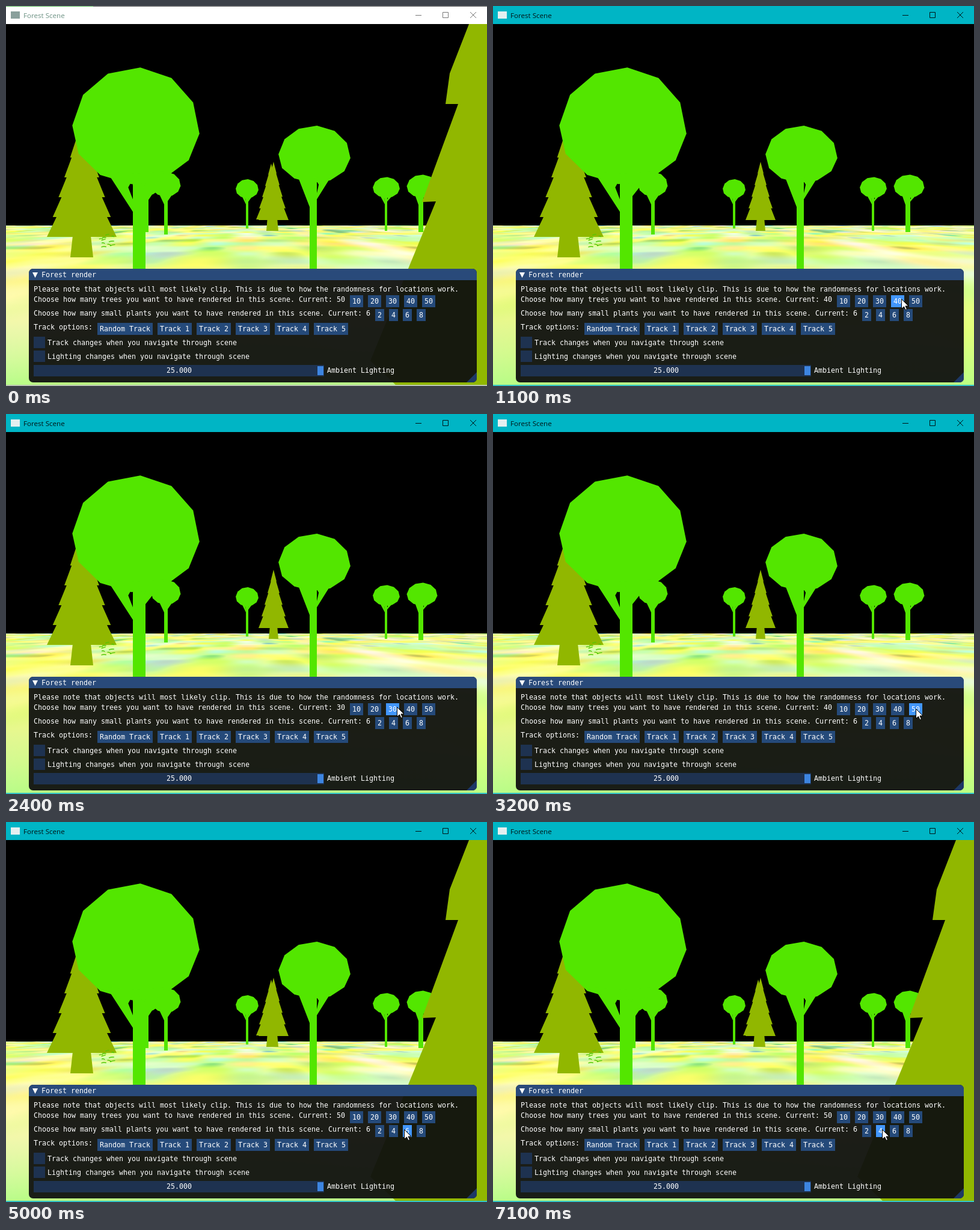
Animation, 800 px wide and 632 px high, one loop 7200 ms. Source, as an HTML page with a canvas:

```html
<!DOCTYPE html>
<html lang="en">
<head>
<meta charset="utf-8">
<title>Forest Scene</title>
<style>
html, body { margin: 0; width: 100%; height: 100%; overflow: hidden; background: #000; }
canvas { display: block; }
</style>
</head>
<body>
<canvas id="stage" width="800" height="632"></canvas>
<script>
const W = 800, H = 632, LOOP = 7200, STEP = 100, HORIZON = 365;
const ctx = document.getElementById('stage').getContext('2d');
const LEAF = '#53e600', PINE = '#91b700';
const MONO = '11.63px "DejaVu Sans Mono", monospace';

// Cursor stops: time, x, y
const PATH = [
  [100, 800, 400], [800, 680, 487], [1500, 677, 487], [1900, 637, 486], [2200, 637, 487],
  [2700, 670, 488], [3200, 703, 490], [3500, 723, 495], [3800, 723, 495], [4000, 703, 490],
  [5000, 662, 511], [5600, 686, 513], [6100, 686, 513], [6200, 675, 513], [7200, 644, 511]
];
const TREES = [[0, 50], [1000, 40], [2100, 30], [2700, 40], [4000, 50]];
const PLANTS = [[0, 6], [5700, 8], [6500, 6]];

const latest = (steps, t) => steps.filter(s => s[0] <= t).pop()[1];

function cursorAt(t) {
  if (t < PATH[0][0]) return null;
  const i = PATH.findIndex(p => p[0] > t);
  const a = PATH[i - 1], b = PATH[i], k = (t - a[0]) / (b[0] - a[0]);
  return [a[1] + (b[1] - a[1]) * k, a[2] + (b[2] - a[2]) * k];
}

function rect(x, y, w, h, color) {
  ctx.fillStyle = color;
  ctx.fillRect(x, y, w, h);
}

function poly(pts, color) {
  ctx.fillStyle = color;
  ctx.beginPath();
  for (const p of pts) ctx.lineTo(p[0], p[1]);
  ctx.fill();
}

function text(s, x, y, color = '#fff', font = MONO) {
  ctx.font = font;
  ctx.fillStyle = color;
  ctx.fillText(s, x, y);
}

function hash(x, y, seed) {
  let n = Math.imul(x, 374761393) ^ Math.imul(y, 668265263) ^ Math.imul(seed, 1274126177);
  n = Math.imul(n ^ (n >>> 13), 1274126177);
  return ((n ^ (n >>> 16)) >>> 0) / 4294967296;
}

function noise(x, y, seed) {
  const i = Math.floor(x), j = Math.floor(y);
  const ease = v => v * v * (3 - 2 * v);
  const u = ease(x - i), v = ease(y - j);
  const a = hash(i, j, seed), b = hash(i + 1, j, seed);
  const c = hash(i, j + 1, seed), d = hash(i + 1, j + 1, seed);
  return a + (b - a) * u + (c - a + (a - b - c + d) * u) * v;
}

// Bright blotches laid flat in perspective
function makeGround() {
  const c = document.createElement('canvas');
  c.width = W;
  c.height = H - HORIZON;
  const g = c.getContext('2d'), img = g.createImageData(W, c.height);
  let p = 0;
  for (let y = 0; y < c.height; y++) {
    const d = y + 20, v = 400 / d, near = Math.min(1, y / 110);
    for (let x = 0; x < W; x++) {
      const u = (x - 400) / d;
      const shade = Math.max(0, 0.32 - noise(u, v, 4)) * 260 * (1 - near);
      img.data[p++] = 185 + 100 * noise(u, v, 1) - shade * 1.4;
      img.data[p++] = 232 + 45 * noise(u, v, 2) - shade * 0.8;
      img.data[p++] = 60 + 150 * noise(u, v, 3) + 40 * noise(u * 2, v * 2, 5);
      img.data[p++] = 255;
    }
  }
  g.putImageData(img, 0, 0);
  return c;
}
const ground = makeGround();

// x is the trunk, cx the crown; fork is where branches meet the trunk, in crown radii
function roundTree(x, cx, y, rx, ry, trunk, base, fork = 1.45) {
  const crown = [], h = trunk / 2, at = (dx, dy) => [cx + dx * rx, y + dy * ry];
  for (let i = 0; i < 12; i++) {
    const a = (i * 30 + 4) * Math.PI / 180, s = Math.sin(a);
    crown.push(at(Math.cos(a), s > 0 ? s * 0.87 : s));
  }
  poly(crown, LEAF);
  rect(x - h, y + ry * 0.7, trunk, base - y - ry * 0.7, LEAF);
  for (const s of [-1, 1]) {
    const end = s < 0 ? fork : fork - 0.25;
    poly([at(s * 0.46, 0.66), [x + s * h, y + end * ry], [x + s * h, y + (end - 0.2) * ry],
      at(s * 0.12, 0.92), at(0, 0.7)], LEAF);
  }
}

function pine(x, top, base, half, tiers, trunk, foot) {
  const edge = s => {
    const pts = [[x, top]];
    for (let i = 1; i <= tiers; i++) {
      const y = top + (base - top) * i / tiers, w = half * i / tiers;
      pts.push([x + s * w, y], [x + s * w * 0.87, y]);
    }
    return pts;
  };
  poly([...edge(-1), ...edge(1).reverse()], PINE);
  poly([[x - trunk * 0.8, base], [x + trunk * 0.8, base], [x + trunk, foot], [x - trunk, foot]], PINE);
}

function sprig(x, y, w, h, count, seed) {
  ctx.strokeStyle = '#4fc800';
  ctx.lineWidth = 1.4;
  ctx.beginPath();
  for (let i = 0; i < count; i++) {
    const px = x + w * hash(i, 1, seed), py = y + h * (i + 0.5) / count;
    const len = 4 + 5 * hash(i, 2, seed), tilt = 5 * hash(i, 3, seed) - 2.5;
    ctx.moveTo(px, py);
    ctx.quadraticCurveTo(px + len / 2, py - 1.5, px + len, py + tilt);
  }
  ctx.stroke();
}

function drawScene(full, plants) {
  rect(0, 30, W, H - 30, '#000');
  ctx.drawImage(ground, 0, HORIZON);
  const haze = ctx.createLinearGradient(0, 400, 0, H);
  haze.addColorStop(0, 'rgba(245,255,140,0)');
  haze.addColorStop(0.4, full ? 'rgba(255,255,185,.6)' : 'rgba(232,255,125,.6)');
  haze.addColorStop(1, 'rgba(165,255,140,.75)');
  rect(0, 400, W, H - 400, haze);

  if (plants === 8) sprig(331, 329, 16, 57, 18, 9);
  roundTree(401, 401, 305, 19, 17, 4, 370);
  roundTree(632, 632.5, 303, 22.5, 18.5, 4, 374);
  roundTree(690, 692, 301, 25.5, 20.5, 8, 376);
  roundTree(266, 266, 298, 24.5, 22, 6, 380);
  if (full) {
    pine(441, 262, 355, 25, 5, 8, 374);
    roundTree(234, 234, 296, 24, 22, 6, 376);
  }
  pine(445, 259, 356, 25, 5, 8, 374);
  roundTree(511, 513, 250, 60, 51, 12, 440, 1.65);
  pine(126, 186, 384, 58, 6, 19, 418);
  sprig(153, 380, 23, 22, 10, 5);
  roundTree(221.5, 216, 206, 106, 104, 21, 440, 1.31);
  if (full) {
    poly([[770, 30], [738, 112], [731, 163], [752, 163], [692, 326], [715, 325],
      [606, 590], [650, H], [W, H], [W, 30]], PINE);
  }
}

function drawTitleBar(active) {
  const ink = active ? '#001416' : '#777';
  rect(0, 0, W, 30, active ? '#00b5c5' : '#fff');
  if (!active) {
    rect(0, 0, W, 1, '#555');
    rect(0, 0, 145, 1, '#55b855');
  }
  rect(0, 630, W, 2, active ? '#35c3c4' : '#b9c4b0');
  rect(8, 9, 15, 12, active ? '#e4eff0' : '#8aa09c');
  text('Forest Scene', 29, 20, active ? ink : '#6d9284',
    '11.6px "Open Sans", "Noto Sans", sans-serif');
  ctx.strokeStyle = ink;
  ctx.lineWidth = 1;
  ctx.beginPath();
  ctx.moveTo(681, 15.5);
  ctx.lineTo(691, 15.5);
  ctx.rect(726.5, 10.5, 9, 9);
  for (const s of [-5, 5]) {
    ctx.moveTo(777 - s, 10);
    ctx.lineTo(777 + s, 20);
  }
  ctx.stroke();
}

function button(label, x, y, mouse) {
  const w = label.length * 7 + 8;
  const over = mouse && mouse[0] >= x && mouse[0] < x + w && mouse[1] >= y && mouse[1] < y + 20;
  rect(x, y, w, 20, over ? '#4296fa' : '#254a7a');
  text(label, x + 4, y + 14);
}

function drawPanel(trees, plants, mouse) {
  ctx.save();
  ctx.beginPath();
  ctx.roundRect(38, 437, 745, 189, 7);
  ctx.clip();
  rect(38, 437, 745, 189, 'rgba(15,15,15,.94)');
  rect(38, 437, 745, 19, '#294a7a');
  poly([[783, 609], [783, 626], [766, 626]], '#1d3866');
  ctx.restore();
  poly([[44, 443], [53, 443], [48.5, 452]], '#fff');
  text('Forest render', 59, 451);
  text('Please note that objects will most likely clip. This is due to how the randomness for locations work.', 46, 475);
  text('Choose how many trees you want to have rendered in this scene. Current: ' + trees, 46, 492);
  text('Choose how many small plants you want to have rendered in this scene. Current: ' + plants, 46, 515);
  text('Track options:', 46, 538);
  for (let i = 0; i < 5; i++) {
    button(String(10 * (i + 1)), 572 + 30 * i, 481, mouse);
    button('Track ' + (i + 1), 252 + 65 * i, 527, mouse);
    if (i < 4) button(String(2 * (i + 1)), 614 + 23 * i, 504, mouse);
  }
  button('Random Track', 152, 527, mouse);
  ['Track', 'Lighting'].forEach((name, i) => {
    rect(46, 550 + 23 * i, 19, 19, '#1e3250');
    text(name + ' changes when you navigate through scene', 69, 564 + 23 * i);
  });
  rect(46, 597, 483, 19, '#1e3250');
  rect(518, 599, 10, 15, '#3d85e0');
  text('25.000', 267, 610);
  text('Ambient Lighting', 534, 610);
}

function drawCursor([x, y]) {
  ctx.save();
  ctx.translate(Math.round(x) + 0.5, Math.round(y) + 0.5);
  poly([[0, 0], [0, 16], [4, 12.5], [6.5, 18], [9, 17], [6.5, 11.5], [11.5, 11.5]], '#fff');
  ctx.closePath();
  ctx.strokeStyle = '#000';
  ctx.lineWidth = 1;
  ctx.stroke();
  ctx.restore();
}

function draw(t) {
  const trees = latest(TREES, t), plants = latest(PLANTS, t), mouse = cursorAt(t);
  drawScene(trees === 50, plants);
  drawTitleBar(t >= 900);
  drawPanel(trees, plants, mouse);
  if (mouse) drawCursor(mouse);
}

const start = performance.now();
let shown = -1;
function tick() {
  const t = Math.floor((performance.now() - start) % LOOP / STEP) * STEP;
  if (t !== shown) draw(shown = t);
  requestAnimationFrame(tick);
}
tick();
</script>
</body>
</html>
```
